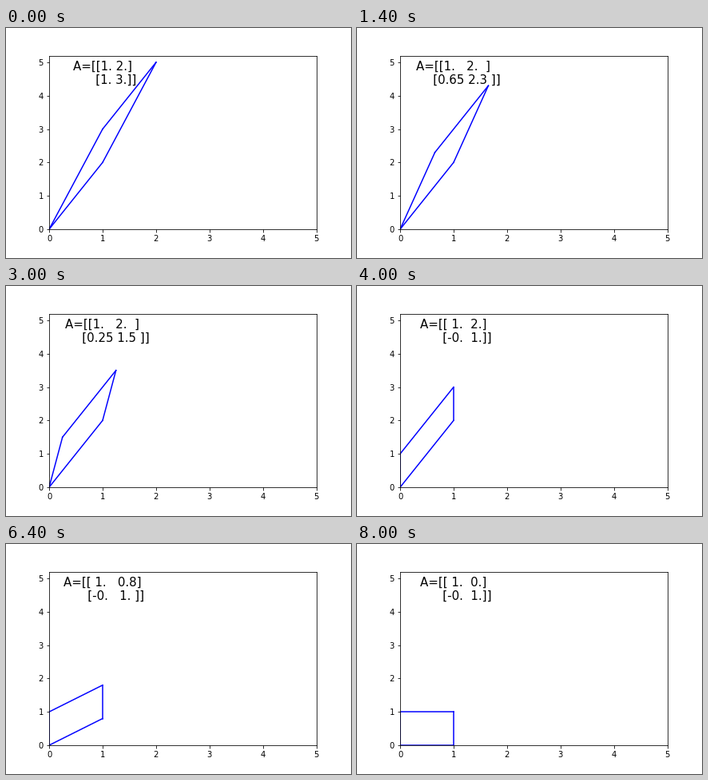
Animation of 432x288 px, one loop 8200 ms. Source, as a matplotlib script:

```python
import numpy as np
import matplotlib.pyplot as plt
from matplotlib.animation import FuncAnimation

STEPS = 20          # frames per row operation
INTERVAL = 200

fig, ax = plt.subplots(figsize=(6, 4), dpi=72)
fig.subplots_adjust(left=0.125, right=0.9, bottom=0.125, top=0.88)
ax.set_xlim(0, 5)
ax.set_ylim(0, 5.2)

sides = [ax.plot([], [], "b", lw=1.5)[0] for _ in range(4)]
label = ax.text(1, 4.35, "", fontsize=15, ha="center", va="baseline")


def matrix(i):
    """Shear away the lower-left entry, then the upper-right one."""
    s = min(i, STEPS) / STEPS
    t = max(i - STEPS, 0) / STEPS
    a = np.array([[1, 2 - 2 * t], [1 - s, 3 - 2 * s]])
    if s == 1:
        a[1, 0] = -0.0
    return np.round(a, 2)


def update(i):
    a = matrix(i)
    u, v = a
    o = np.zeros(2)
    corners = [o, u, u + v, v, o]
    for side, p, q in zip(sides, corners, corners[1:]):
        side.set_data([p[0], q[0]], [p[1], q[1]])
    label.set_text("A=" + str(a).replace("\n", "\n" + " " * 6))
    return [*sides, label]


anim = FuncAnimation(fig, update, frames=2 * STEPS + 1, init_func=lambda: update(0),
                     interval=INTERVAL, repeat=True, repeat_delay=0)
plt.show()
```
